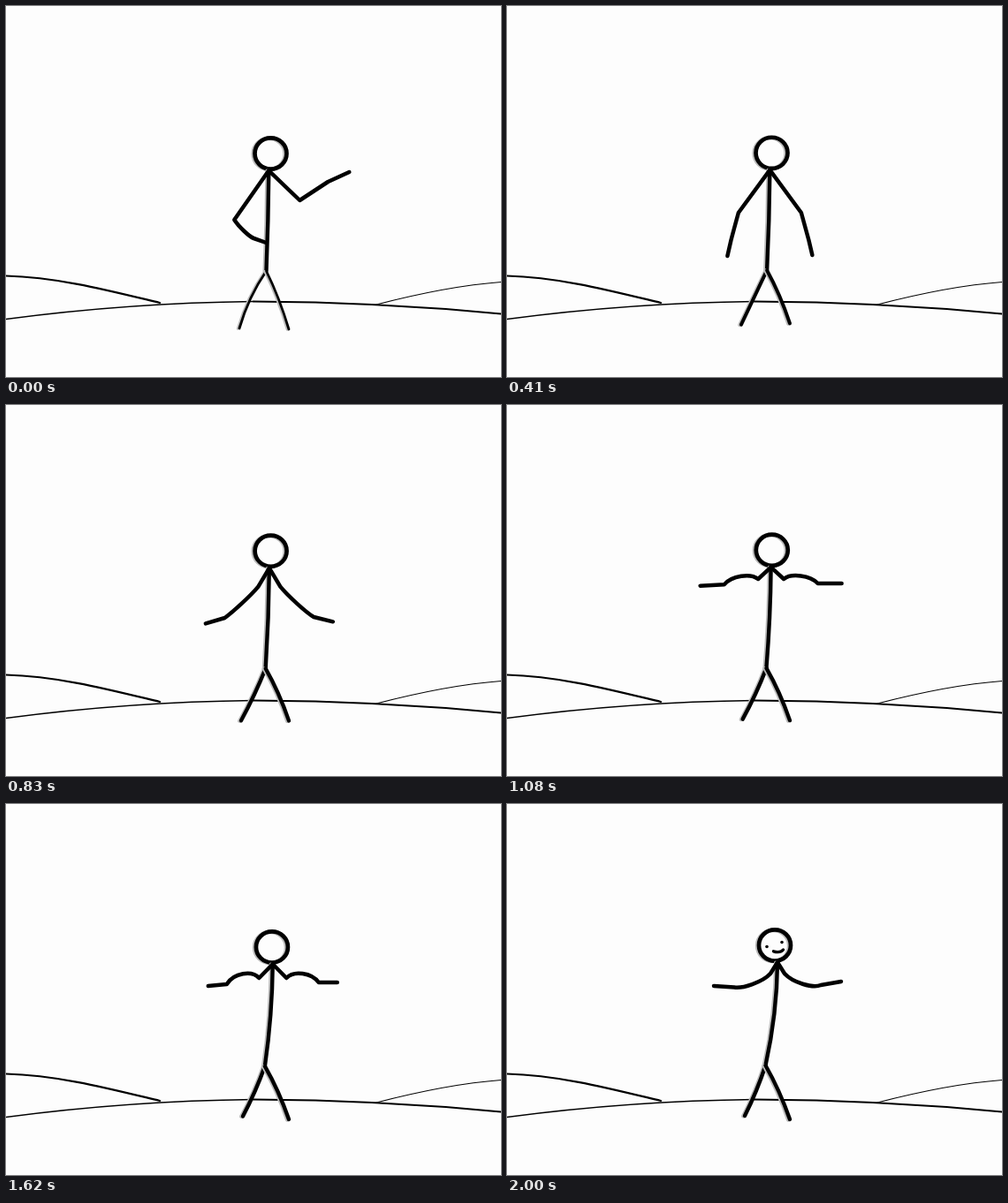
Write an HTML page with a canvas that moves like this. It is 560 px wide and 420 px high and loops after 2160 ms.

```html
<!DOCTYPE html>
<html>
<head>
<meta charset="utf-8">
<style>
html, body { margin: 0; width: 100%; height: 100%; overflow: hidden; background: #fdfdfd; }
canvas { display: block; }
</style>
</head>
<body>
<canvas id="stage" width="560" height="420"></canvas>
<script>
const ctx = document.getElementById('stage').getContext('2d');
const LOOP = 2160, LAST = 15;

// Three bursts of five drawings, 125 ms apart, on a 10 ms clock.
const starts = [0];
for (let burst = 0; burst < 3; burst++)
  for (let i = 0; i < 5; i++)
    starts.push(10 * Math.floor((500 + 2000 * burst + 375 * i) / 30));

// Arm poses; x counts outwards from the neck, bulge lifts the forearm's curve.
const pose = (step, elbow, bulge, wrist, hand) => ({ step, values: [...elbow, bulge, ...wrist, ...hand] });
const shrug = [
  pose(3, [35.5, 234], 0, [44, 265], [48, 282]),
  pose(5, [11.5, 210], -8, [49, 259], [68, 267]),
  pose(8, [14.5, 197], 8, [53, 202], [80, 202]),
  pose(10, [17, 197], 28, [54, 201], [77, 202]),
  pose(12, [15.5, 197], 10, [52, 202], [73, 202]),
  pose(LAST, [8, 192], -7, [49, 205], [72, 201])
];
const leftArm = [pose(0, [39, 242], -3, [17, 263], [3, 268]), ...shrug];
const rightArm = [pose(0, [35, 220], 0, [67, 199], [91, 188]), ...shrug];

const mix = (a, b, k) => a + (b - a) * k;

function poseAt(keys, step) {
  const next = Math.max(1, keys.findIndex(key => key.step >= step));
  const a = keys[next - 1], b = keys[next];
  const k = (step - a.step) / (b.step - a.step);
  return a.values.map((v, i) => mix(v, b.values[i], k));
}

function stroke(path, width, color = '#000') {
  ctx.lineWidth = width;
  ctx.strokeStyle = color;
  ctx.stroke(path instanceof Path2D ? path : new Path2D(path));
}

function shaded(path, width) {
  ctx.save();
  ctx.translate(-1.8, 0.4);
  stroke(path, width, '#bbb');
  ctx.restore();
  stroke(path, width);
}

function ellipse(x, y, rx, ry) {
  const path = new Path2D();
  path.ellipse(x, y, rx, ry, 0, 0, 2 * Math.PI);
  return path;
}

function drawLand() {
  stroke('M0 305.5C60 307 120 323 174 336', 2.2);
  stroke('M0 354.5Q140 336 280 334.5', 1.4);
  stroke('M280 334.5Q420 335 560 348.5', 1.9);
  stroke('M419 338Q500 317 560 312.5', 1.1);
}

function drawArm(keys, side, step, neckX, neckY) {
  const [elbowX, elbowY, bulge, wristX, wristY, handX, handY] = poseAt(keys, step);
  const drop = side < 0 ? 5 * step / LAST : 0; // the left hand sinks a little
  const at = (x, y) => `${neckX + side * x} ${y} `;
  const handle = k => at(mix(elbowX, wristX, k), mix(elbowY, wristY, k) - bulge);
  stroke(`M${neckX} ${neckY}L${at(elbowX, elbowY)}` +
    `C${handle(0.22)}${handle(0.78)}${at(wristX, wristY + drop / 2)}L${at(handX, handY + drop)}`, 4.5);
}

function drawLeg(hipX, hipY, footX, footY, bendX, bendY, width) {
  shaded(`M${hipX} ${hipY}Q${(hipX + footX) / 2 + bendX} ${(hipY + footY) / 2 + bendY} ${footX} ${footY}`, width);
}

function drawFace(x, y) {
  ctx.fill(ellipse(x - 9, y + 1.5, 1.8, 1.8));
  ctx.fill(ellipse(x + 8, y - 3.5, 1.8, 1.8));
  stroke(`M${x - 1.5} ${y + 6.8}Q${x + 6} ${y + 9} ${x + 9.5} ${y + 5}`, 3.4);
}

// The body straightens up and leans right while the feet settle.
function drawFigure(step) {
  const p = step / LAST, rest = 1 - p, slack = rest ** 6;
  const headX = 299.5 + 3.5 * p ** 4, headY = 167 - 7 * p ** 1.5;
  const neckX = 297.3 + 8.7 * p ** 3, neckY = headY + 19.3;
  const hipX = 294.5 - 2 * p, hipY = 300 - 4 * p;
  const legWidth = 4.4 - 1.6 * slack;

  shaded(ellipse(headX, headY, 18, 17.6), 4.7);
  shaded(`M${neckX} ${neckY}Q${neckX - 0.5} ${(neckY + hipY) / 2} ${hipX} ${hipY}`, 4.4);
  drawLeg(hipX, hipY, 264 + 5 * p, 353 + 12 * rest ** 2, 2 - 7 * slack, 1 - 4 * slack, legWidth);
  drawLeg(hipX, hipY, 320, 357 + 9 * slack, 2, -3, legWidth);
  drawArm(leftArm, -1, step, neckX, neckY);
  drawArm(rightArm, 1, step, neckX, neckY);
  if (step >= LAST - 1) drawFace(headX, headY);
}

function draw() {
  const t = performance.now() % LOOP;
  ctx.fillStyle = '#fdfdfd';
  ctx.fillRect(0, 0, 560, 420);
  ctx.fillStyle = '#000';
  ctx.lineCap = ctx.lineJoin = 'round';
  drawLand();
  drawFigure(starts.filter(start => start <= t).length - 1);
  requestAnimationFrame(draw);
}
draw();
</script>
</body>
</html>
```
